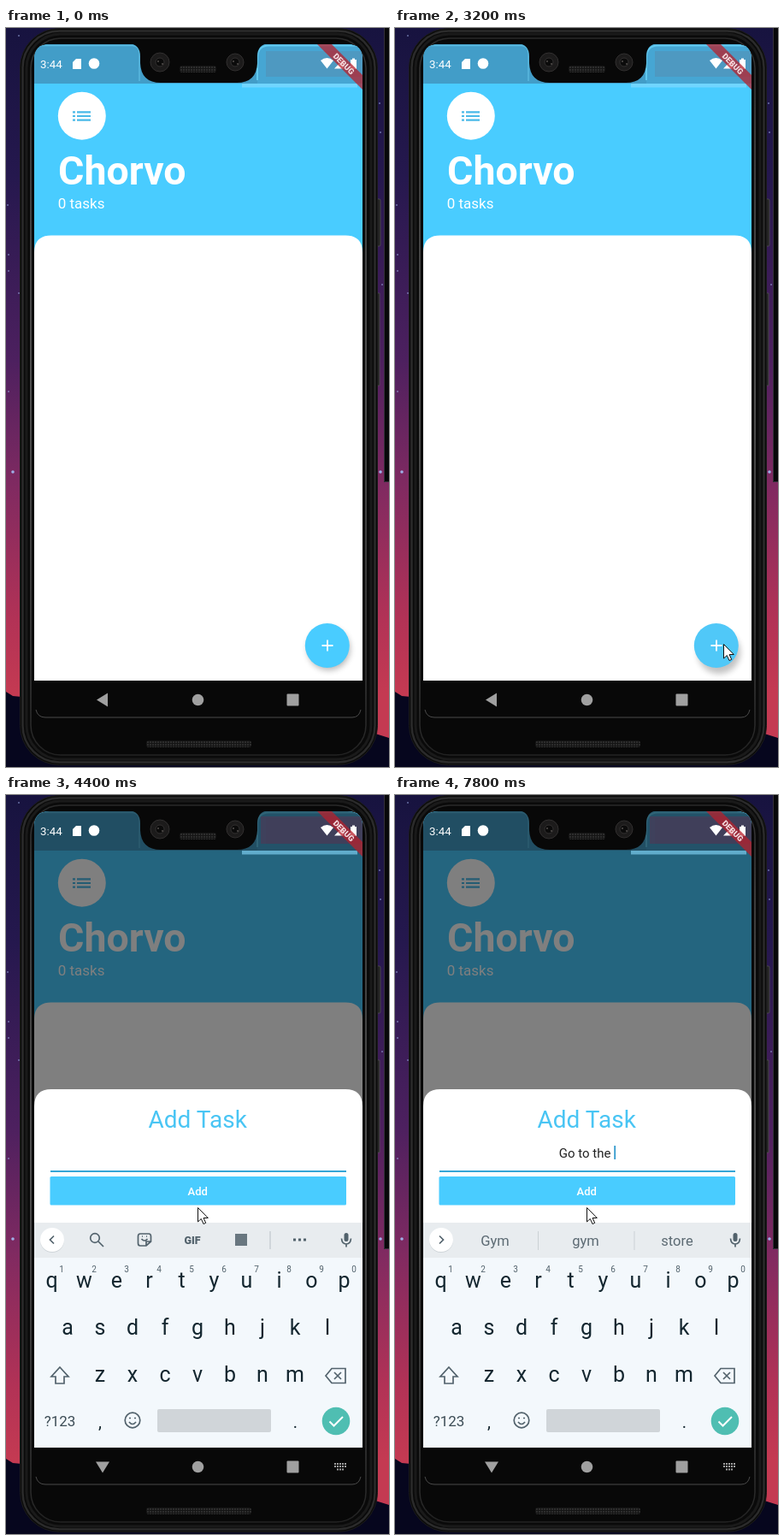
These frames come from a looping animation (448 by 864 pixels, 8 s). An HTML page:

```html
<!DOCTYPE html>
<html lang="en">
<head>
<meta charset="utf-8">
<title>Task list</title>
<style>
html, body { margin: 0; width: 100%; height: 100%; overflow: hidden; background: #06061e; }
svg { display: block; width: 448px; height: 864px; font-family: Roboto, "Noto Sans", sans-serif; }
.mid { text-anchor: middle; }
.line { fill: none; stroke: #52626c; stroke-width: 1.7; }
.comp { text-decoration: underline; }
</style>
</head>
<body>
<svg viewBox="0 0 448 864">
  <defs>
    <linearGradient id="sky" x2="0" y2="1">
      <stop offset="0" stop-color="#17133f"/>
      <stop offset=".2" stop-color="#25184e"/>
      <stop offset=".45" stop-color="#4d205f"/>
      <stop offset=".62" stop-color="#802a61"/>
      <stop offset=".8" stop-color="#b23256"/>
      <stop offset=".9" stop-color="#c43a52"/>
    </linearGradient>
    <linearGradient id="rim" x2="0" y2="1">
      <stop offset="0" stop-color="#292929"/>
      <stop offset=".12" stop-color="#4b4b4b"/>
      <stop offset=".5" stop-color="#686868"/>
      <stop offset=".85" stop-color="#404040"/>
      <stop offset="1" stop-color="#222"/>
    </linearGradient>
    <pattern id="mesh" width="3" height="3" patternUnits="userSpaceOnUse">
      <rect width="3" height="3" fill="#151515"/><path d="M0 0H2V2H0Z" fill="#2d2d2d"/>
    </pattern>
    <clipPath id="screen"><path d="M33 763V37Q33 19 51 19H399Q417 19 417 37V763Z"/></clipPath>
    <filter id="blur" x="-50%" y="-50%" width="200%" height="200%"><feGaussianBlur stdDeviation="3.5"/></filter>
  </defs>

  <!-- wallpaper -->
  <rect width="448" height="864" fill="url(#sky)"/>
  <path d="M0 776L8 781L40 784L400 815L448 830V864H0Z" fill="#06061e"/>
  <g id="stars" fill="#9fb0e8"></g>
  <path d="M442 0H448V531H442Z" fill="#08080a"/>
  <path d="M442.5 0V530.5H448" fill="none" stroke="#34303a"/>

  <!-- phone body -->
  <path d="M433 200H437Q438 200 438 202V253Q438 255 437 255H433ZM433 310H437V418H433Z" fill="#242424" stroke="#555" stroke-width=".7"/>
  <rect x="16.5" y=".5" width="418" height="861" rx="46" fill="#0a0a0a" stroke="#1b1b1b"/>
  <rect x="19.5" y="3.5" width="412" height="855" rx="43" fill="none" stroke="#2b2b2b" stroke-width="2.5"/>
  <rect x="24" y="7" width="403" height="848" rx="40" fill="none" stroke="#1a1a1a" stroke-width="3"/>
  <rect x="29" y="12" width="392" height="838" rx="35" fill="#080808" stroke="url(#rim)" stroke-width="1.5"/>
  <path d="M35 797Q37 806 46 806H405Q413 806 415 797" fill="none" stroke="#4a4a4a"/>
  <rect x="164" y="833" width="123" height="8" rx="3" fill="url(#mesh)"/>

  <g clip-path="url(#screen)">
    <!-- task list page -->
    <path d="M33 19H417V763H33Z" fill="#49ccff"/>
    <path d="M33 19H417V65H33Z" fill="#429dc8"/>
    <path d="M33 20.5H148Q156 21 156 30V62" fill="none" stroke="#58b9df" stroke-width="1.5"/>
    <path d="M294 19H417V65H294Z" fill="#46a6d3"/>
    <path d="M294 61V33Q295 21 307 20.5H417" fill="none" stroke="#61c9ef" stroke-width="2"/>
    <path d="M304 27H417V57H304Z" fill="#5096bd" opacity=".8"/>
    <circle cx="88.8" cy="102.7" r="28" fill="#fff"/>
    <path d="M78 98.3h3m2 0h16M78 103h3m2 0h16M78 107.7h3m2 0h16" stroke="#49b9e8" stroke-width="2.2"/>
    <text x="61" y="183" font-size="46.5" font-weight="700" fill="#fff">Chorvo</text>
    <text x="60.700" y="211" font-size="17" fill="#fff">0 tasks</text>
    <path d="M33 763V262.500Q33 242.500 53 242.500H397Q417 242.500 417 262.500V763Z" fill="#fff"/>
    <circle id="shade" r="25" filter="url(#blur)"/>
    <circle id="fab" cx="375.800" cy="722" r="26"/>
    <path d="M369.5 722h13m-6.5-6.5v13" stroke="#fff" stroke-width="1.8"/>

    <!-- bottom sheet -->
    <g id="modal">
      <path d="M33 19H417V763H33Z" opacity=".5"/>
      <path d="M298 25H417V57H298Z" fill="#493b58" opacity=".75"/>
      <g id="sheet">
        <path d="M33 440V20Q33 0 53 0H397Q417 0 417 20V440Z" fill="#fff"/>
        <text class="mid" x="224.2" y="45" font-size="28" fill="#49c5f4">Add Task</text>
        <path id="rule" d="M52 0H398"/>
        <rect x="51.5" y="102" width="346.5" height="33.5" rx="1.5" fill="#49ccff"/>
        <text class="mid" x="224.2" y="123.5" font-size="13" font-weight="500" fill="#fff">Add</text>
        <text id="field" y="79.5" font-size="15" fill="#222"><tspan id="done"></tspan><tspan id="word" class="comp"></tspan></text>
        <path id="caret" d="M0 66V82" stroke="#3199cd" stroke-width="1.8"/>
      </g>
      <g id="board">
        <path d="M33 500H417V763H33Z" fill="#f3f8fc"/>
        <path d="M33 500H417V541H33Z" fill="#e8ecef"/>
        <g id="keys" class="mid" fill="#13262f"></g>
        <circle cx="54" cy="521" r="14" fill="#cfd5d9"/>
        <circle cx="54" cy="520" r="14" fill="#fff"/>
        <path id="chevron" class="line"/>
        <g id="tools" class="line">
          <circle cx="104" cy="518" r="5.3"/><path d="M108 522L114 528"/>
          <path d="M157 513H167Q169.5 513 169.5 516V522L164 527H157Q154.5 527 154.5 524V516Q154.5 513 157 513ZM164 527V522H169M158.5 519Q162 523 165.5 519M159 516h1m4 0h1"/>
          <text class="mid" x="218" y="524.5" font-size="12.5" font-weight="900" fill="#52626c" stroke="none">GIF</text>
          <path d="M268 513H282V527H268Z" fill="#697780" stroke="none"/>
          <path d="M309 510V531" stroke="#ccd2d6"/>
          <path d="M336 520h3m3 0h3m3 0h3" stroke-width="3"/>
        </g>
        <g id="hints" class="mid" font-size="16.5" fill="#5c6a73">
          <path d="M167.5 510V532M280 510V532" stroke="#cbd1d5"/>
          <text x="117" y="527"></text><text x="223" y="527"></text><text x="330" y="527"></text>
        </g>
        <rect x="395.5" y="512" width="5" height="10" rx="2.5" fill="#52626c"/>
        <path class="line" d="M392.5 518.5Q393 525 398 525Q403 525 403.5 518.5M398 525V528.5"/>
        <path class="line" d="M63 669L73 680H68V688H58V680H53Z"/>
        <path class="line" d="M374 679L381 670.5H397V687.5H381ZM384 675l8 8m0-8l-8 8"/>
        <circle class="line" cx="148" cy="731" r="8.8"/>
        <path class="line" d="M144 733Q148 738 152 733M144 728.5h2m4 0h2"/>
        <rect x="177" y="718" width="133" height="27" rx="2" fill="#d0d5d9"/>
        <circle cx="386" cy="732" r="16.3" fill="#4fbeb2"/>
        <path d="M378.5 732.5L383.5 737.5L394 727" fill="none" stroke="#fff" stroke-width="2"/>
      </g>
    </g>

    <!-- status bar -->
    <path d="M276 65H411V69.5H276Z" fill="#8addff" opacity=".6"/>
    <g fill="#fff">
      <text x="40" y="46.5" font-size="13.3">3:44</text>
      <path d="M78 40L82 36H88V48H78Z"/>
      <circle cx="103" cy="41.5" r="6.3"/>
      <path d="M368 38Q375.5 32 383 38L375.5 47.5ZM384 47.5L395 36V47.5ZM403 37H405V35.5H408V37H410V48H403Z"/>
    </g>
    <path d="M364 19H381L417 55V72Z" fill="#b7202c" opacity=".75"/>
    <text class="mid" font-size="9.5" font-weight="900" fill="#f4dcdf" transform="translate(395 42) rotate(45)" y="3.2">DEBUG</text>
  </g>

  <!-- notch -->
  <path d="M143 18Q157 19 157 33V41Q158 64 181 64H270Q293 64 294 41V33Q294 19 308 18Z" fill="#080808"/>
  <rect x="203" y="44" width="43" height="8" rx="3" fill="url(#mesh)"/>
  <g fill="#1c1b1b" stroke="#323030">
    <circle cx="180" cy="40" r="11"/><circle cx="268" cy="40" r="10"/>
    <circle cx="180" cy="40" r="5" fill="#0b0b0b"/><circle cx="268" cy="40" r="5" fill="#0b0b0b"/>
  </g>
  <path d="M177 39h2m3 3h2M265 39h2m3 3h2" stroke="#77706c"/>

  <!-- navigation bar -->
  <g fill="#a0a0a0">
    <path id="back" d="M-7 0L6 -8V8Z"/>
    <circle cx="224.5" cy="785.5" r="6.8"/>
    <rect x="328.5" y="778.5" width="14" height="14" rx="1"/>
  </g>
  <path id="toggle" d="M384 782H398M384 785H398M387 788.5H395" stroke="#a0a0a0" stroke-width="1.8" stroke-dasharray="2 1"/>
  <path id="mouse" d="M0 0V16.5L3.8 13L6.5 19L9.2 17.8L6.6 12H11.8Z" fill="#fff" stroke="#111"/>
</svg>

<script>
const $ = id => document.getElementById(id);
const LOOP = 8000, STEP = 200;

// time, typed text, word suggestions
const typing = [
  [0, '', ''],
  [5000, 'G', 'Good,Go,Great'],
  [5400, 'Go', 'Go,Good,Got'],
  [5600, 'Go ', 'to,ahead,back'],
  [6000, 'Go t', 'to,the,too'],
  [6400, 'Go to', 'to,too,to the'],
  [6600, 'Go to ', 'the,bed,sleep'],
  [6800, 'Go to t', 'the,to,that'],
  [7000, 'Go to th', 'the,that,this'],
  [7200, 'Go to the', 'the,then,they'],
  [7800, 'Go to the ', 'Gym,gym,store']
];

// time, x, y
const mousePath = [
  [0, 460, 330], [200, 460, 330], [1000, 171, 584], [1200, 171, 584],
  [2000, 384.5, 720.5], [3600, 384.5, 720.5], [4200, 224.5, 482.5], [8000, 224.5, 482.5]
];

const pen = document.createElement('canvas').getContext('2d');
pen.font = '15px Roboto, "Noto Sans", sans-serif';

const label = (x, y, size, text, color = '#13262f') =>
  `<text x="${x}" y="${y}" font-size="${size}" fill="${color}">${text}</text>`;

function buildKeys() {
  const row = (letters, x, y) => [...letters].map((c, i) => label(x + 38 * i, y, 25, c)).join('');
  const digits = [...'1234567890'].map((d, i) => label(65 + 38 * i, 558, 10, d, '#52626c')).join('');
  $('keys').innerHTML = row('qwertyuiop', 53.5, 576) + digits +
    row('asdfghjkl', 72, 631) + row('zxcvbnm', 110, 686) +
    label(63, 738, 17, '?123', '#3c4c55') + label(110, 740, 20, ',') + label(338.5, 740, 20, '.');
}

function buildStars() {
  const spots = [[2, 207], [3, 265], [3, 284], [15, 9], [15, 310], [3, 425], [8, 519, 1.8],
    [438, 519, 1.8], [437, 88], [440, 300], [438, 122]];
  $('stars').innerHTML = spots.map(([x, y, r = 0.8]) => `<circle cx="${x}" cy="${y}" r="${r}"/>`).join('');
}

const show = (id, on) => $(id).setAttribute('display', on ? 'inline' : 'none');
const set = (id, values) => {
  for (const key in values) $(id).setAttribute(key, values[key]);
};

function mouseAt(t) {
  const i = mousePath.findIndex(p => p[0] > t);
  const [t0, x0, y0] = mousePath[i - 1], [t1, x1, y1] = mousePath[i];
  const k = (t - t0) / (t1 - t0), ease = k * k * (3 - 2 * k);
  return [x0 + (x1 - x0) * ease, y0 + (y1 - y0) * ease];
}

function drawField(t) {
  const [, text, words] = typing.filter(s => s[0] <= t).pop();
  const solid = s => s.replace(/ /g, '\u00a0');
  const cut = text.lastIndexOf(' ') + 1;
  const width = pen.measureText(solid(text)).width;
  $('done').textContent = solid(text.slice(0, cut));
  $('word').textContent = text.slice(cut);
  set('field', { x: 224 - width / 2 });
  set('caret', { transform: `translate(${224 + width / 2 + (text ? 1 : 0)} 0)` });
  show('caret', text || (t - 3600) % 1000 < 500);
  show('tools', !text);
  show('hints', text);
  set('chevron', { d: text ? 'M52 515.5L56.5 520L52 524.5' : 'M56 515.5L51.5 520L56 524.5' });
  const list = words.split(',');
  $('hints').querySelectorAll('text').forEach((el, i) => { el.textContent = list[i] || ''; });
}

function draw(now) {
  const t = Math.floor(now % LOOP / STEP) * STEP;
  const open = t >= 3400, ready = t >= 3600, pressed = t === 3200;
  show('modal', open);
  show('board', ready);
  show('toggle', open);
  set('sheet', { transform: `translate(0 ${ready ? 344 : 439})` });
  set('rule', {
    stroke: ready ? '#35a5d6' : '#777',
    'stroke-width': ready ? 2 : 1,
    transform: `translate(0 ${ready ? 96 : 95.5})`
  });
  set('back', { transform: `translate(113 785.5) rotate(${ready ? -90 : open ? -16 : 0})` });
  set('fab', { fill: pressed ? '#50c8f8' : '#49ccff' });
  set('shade', { cx: pressed ? 379 : 377.5, cy: pressed ? 730 : 726, opacity: pressed ? 0.24 : 0.28 });
  set('mouse', { transform: `translate(${mouseAt(t)})` });
  drawField(t);
}

buildKeys();
buildStars();
const start = performance.now();
function tick() {
  draw(performance.now() - start);
  requestAnimationFrame(tick);
}
tick();
</script>
</body>
</html>
```
